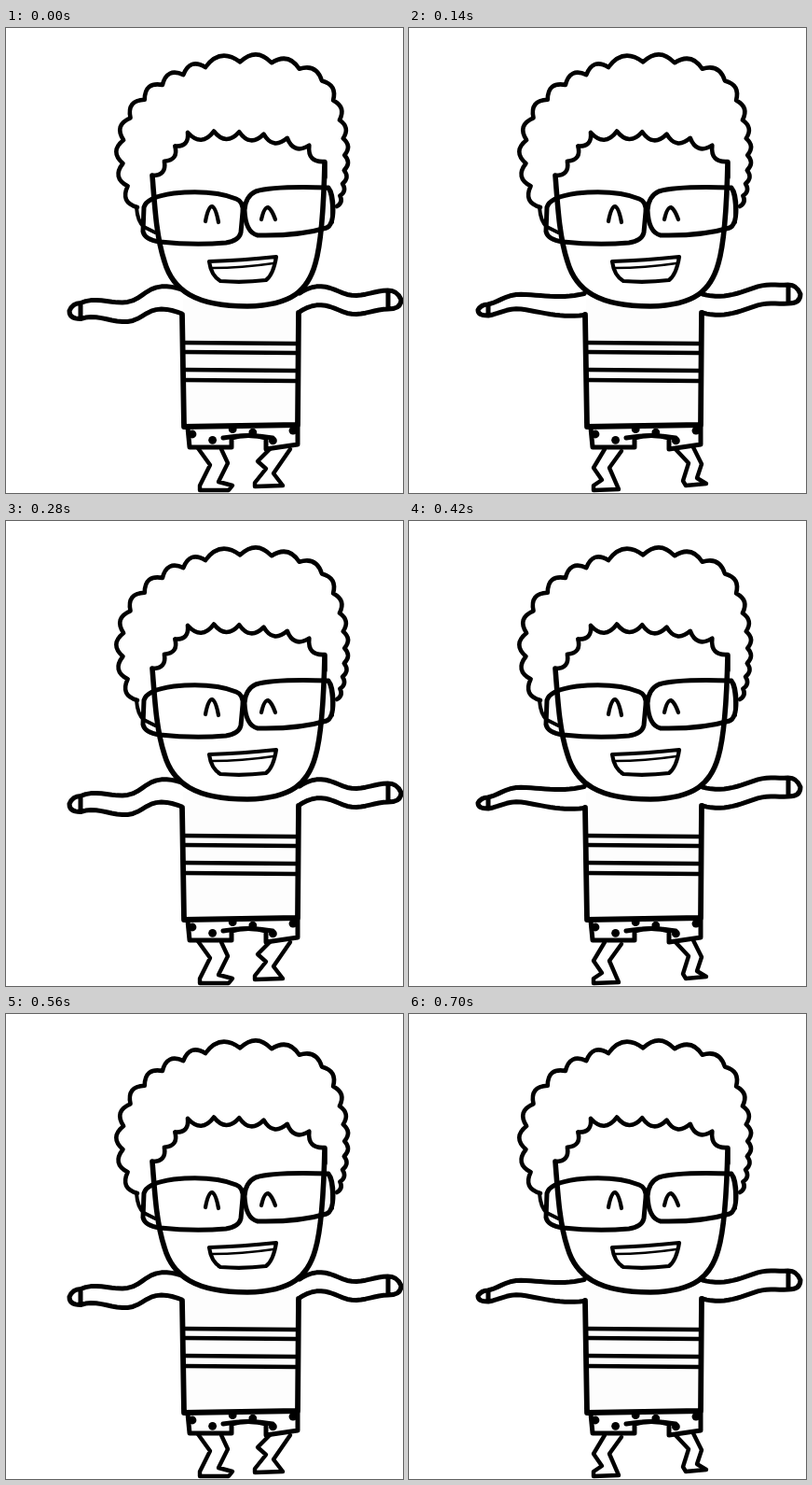
An HTML page that plays this animation: 426x498 px, repeating every 0.84 s.

```html
<!DOCTYPE html>
<html lang="en">
<head>
<meta charset="utf-8">
<title>Dancing doodle</title>
<style>
html, body { margin: 0; width: 100%; height: 100%; overflow: hidden; background: #fff; }
svg { display: block; width: 100vw; height: 100vh; }
.ink { fill: none; stroke: #000; stroke-width: 5; stroke-linecap: round; stroke-linejoin: round; }
.paper { fill: #fff; }
</style>
</head>
<body>
<svg viewBox="0 0 426 498">
  <g class="ink">
    <path id="arms"/>
    <path id="legs" stroke-width="4.4"/>

    <g id="shorts">
      <path class="paper" d="M195 428L197 449H242V439Q260 434 279 439V451L313 446V427"/>
      <path d="M233 439Q260 434 286 439"/>
      <g id="dots" class="dots" fill="#000" stroke="none"></g>
    </g>

    <g id="shirt">
      <path fill="#fdfdfd" stroke="none" d="M190 290H314V426H191Z"/>
      <path stroke-width="5.8" d="M189 307L191 427L313 425L314 305"/>
      <path id="stripes" stroke-width="4.4"/>
    </g>

    <g id="head">
      <path class="paper" stroke="none" d="M157 158C161 225 164 298 260 298C335 297 339 235 342 150L300 115H200Z"/>
      <path stroke-width="5.6" d="M157 158C160 198 162 226 170 250C179 281 203 298 259 298C307 297 324 281 332 252C339 228 341 190 342 144V160"/>
      <path id="hair" stroke-width="4.6"/>
      <path stroke-width="4" d="M140 192Q141 207 148 213L160 219M345 171Q351 178 350 208"/>
    </g>

    <g id="glasses">
      <path d="M148 192Q151 181 180 177Q222 173 247 183Q255 186 254 197L252 219Q250 228 236 230Q202 233 165 229Q149 227 147 218Z"/>
      <path d="M256 195Q257 180 268 175Q287 169 346 171Q351 177 351 194Q351 211 344 214Q314 223 270 222Q257 219 256 195Z"/>
    </g>

    <g id="face" stroke-width="4.2">
      <path d="M214 207Q217 191 221 191Q225 192 228 208M274 205Q277 192 281 192Q285 194 289 205"/>
      <path class="paper" d="M218 250Q253 249 290 245Q287 264 279 270Q255 273 230 271Q220 265 218 250Z"/>
      <path stroke-width="2.4" d="M221 257Q253 257 287 252"/>
    </g>
  </g>
</svg>
<script>
const BEAT = 140;
const SVG = 'http://www.w3.org/2000/svg';
const $ = id => document.getElementById(id);
const draw = (id, d) => $(id).setAttribute('d', d);
const range = (n, fn) => Array.from({ length: n }, (_, i) => fn(i));

// n + 1 points along a path; each step is `ratio` times the one before.
function sample(d, n, ratio = 1) {
  const path = document.createElementNS(SVG, 'path');
  path.setAttribute('d', d);
  const steps = range(n, i => ratio ** i);
  const unit = path.getTotalLength() / steps.reduce((a, b) => a + b);
  let s = 0;
  return [0, ...steps].map(step => path.getPointAtLength(s += step * unit));
}

// A chain of curls along a spine; a negative depth curls to the right of travel.
function curls(spine, n, depth, ratio) {
  const p = sample(spine, n, ratio);
  return `M${p[0].x} ${p[0].y}` + p.slice(1).map((b, i) => {
    const a = p[i];
    const cx = (a.x + b.x) / 2 + 2 * depth * (b.y - a.y);
    const cy = (a.y + b.y) / 2 - 2 * depth * (b.x - a.x);
    return `Q${cx} ${cy} ${b.x} ${b.y}`;
  }).join('');
}

// Two sides of a tapering sleeve, a cuff line and a rounded hand.
function arm(spine, shoulder, wrist, reach) {
  const n = 20;
  const p = sample(spine, n);
  const side = k => 'M' + p.map((q, i) =>
    `${q.x} ${q.y + k * (shoulder + (wrist - shoulder) * i / n) / 2}`).join('L');
  const { x, y } = p[n], h = wrist / 2, tip = x + reach;
  return side(-1) + side(1) +
    `M${x} ${y - h}V${y + h}Q${tip} ${y + h} ${tip} ${y}Q${x + reach * 0.7} ${y - h} ${x} ${y - h}`;
}

draw('hair',
  curls('M141 192C116 150 122 100 147 79C158 64 180 52 214 42', 8, 0.3) +
  curls('M214 42C262 30 318 36 343 60C360 92 372 140 355 191', 12, 0.25, 0.9) +
  curls('M157 158C168 150 182 120 195 112', 3, -0.3) +
  curls('M195 112C230 108 300 112 326 126L342 143', 6, -0.3, 0.97));

draw('stripes', [337, 347, 366, 377].map(y => `M192 ${y}L311 ${y + 1}`).join(''));

$('dots').innerHTML = range(6, i =>
  `<circle cx="${200 + 21.6 * i}" cy="${435 + 7 * Math.sin(2 * i)}" r="4.4"/>`).join('');

const poses = [
  {
    arms: arm('M189 293C152 280 150 302 130 304C112 306 98 296 80 303', 26, 17, -12) +
      arm('M315 294C335 281 347 288 362 294C378 301 394 291 410 291', 20, 20, 14),
    legs: 'M206 450L219 468L208 490V495H239L243 490L228 486L238 466L231 451' +
      'M284 450L270 464L279 472L267 487V491L297 490L287 477L305 451'
  },
  {
    arms: arm('M188 296C160 301 138 294 118 293C104 293 96 300 85 302', 23, 12, -11) +
      arm('M315 295C336 301 354 294 371 288C385 283 394 286 407 285', 20, 20, 13),
    legs: 'M210 451L198 471L207 484L198 490V495L225 494L215 471L228 453' +
      'M285 450L300 466L294 485L297 490L319 488L309 482L314 467L305 449'
  }
];

let shown = -1;
function render(ms) {
  const i = Math.floor(ms / BEAT) % poses.length;
  if (i === shown) return;
  shown = i;
  for (const id in poses[i]) draw(id, poses[i][id]);
}

let start;
function tick(now) {
  start ??= now;
  render(now - start);
  requestAnimationFrame(tick);
}
render(0);
requestAnimationFrame(tick);
</script>
</body>
</html>
```
